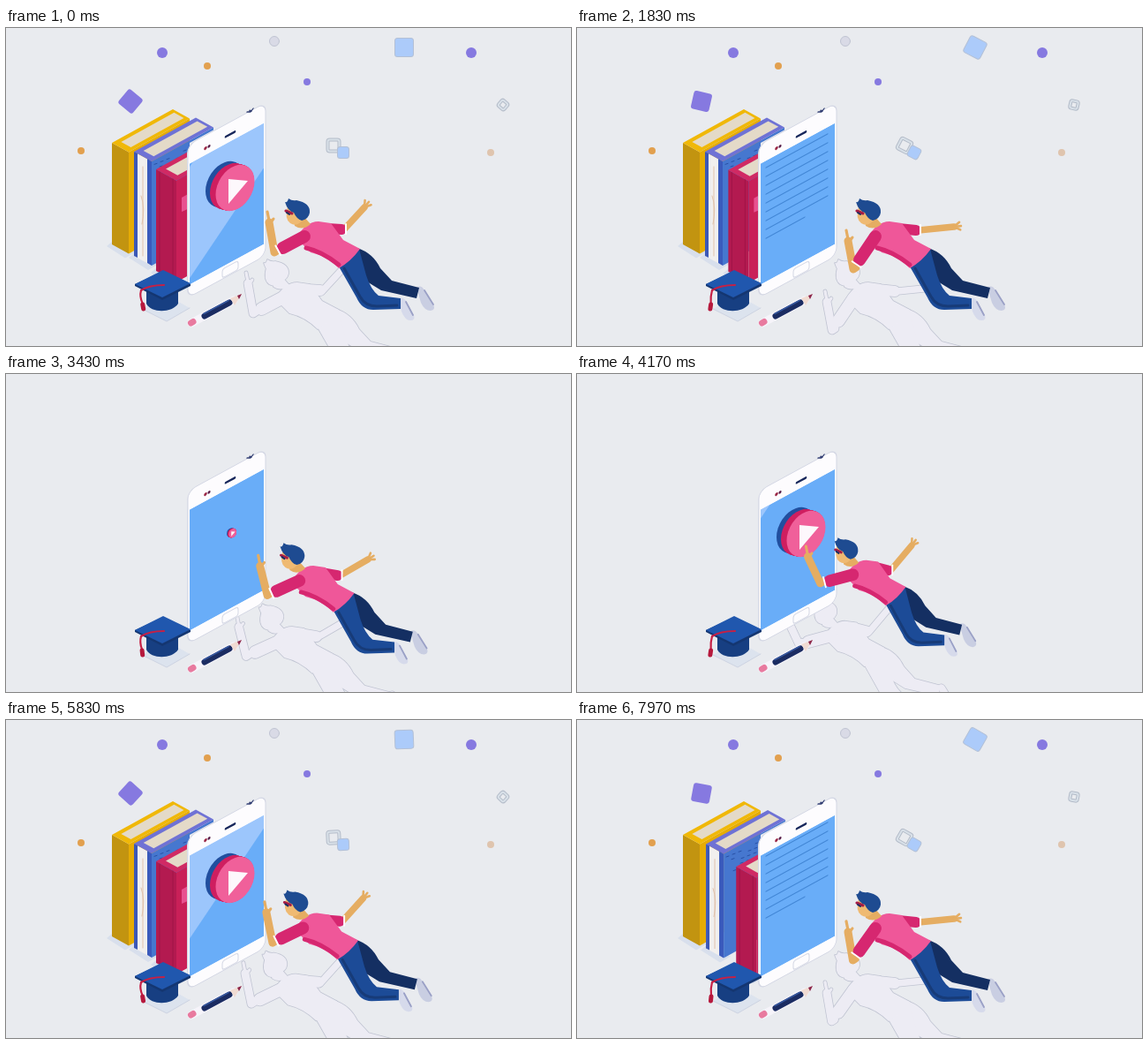
Recreate the animation shown at these times as an HTML page with a canvas. Size 640x360 px, loop 8 s.

```html
<!DOCTYPE html>
<html lang="en">
<head>
<meta charset="utf-8">
<title>Learning on a phone</title>
<style>
  html, body { margin: 0; width: 100%; height: 100%; overflow: hidden; background: #e9ebef; }
  canvas { display: block; width: 640px; height: 360px; }
</style>
</head>
<body>
<canvas width="640" height="360"></canvas>
<script>
const ctx = document.querySelector('canvas').getContext('2d');
const LOOP = 8000, CYCLE = 6000, BG = '#e9ebef', GREY = '#c0c4d2', SKIN = '#e5ad62';
ctx.lineJoin = ctx.lineCap = 'round';

const clamp = x => Math.max(0, Math.min(1, x));
const smooth = x => x * x * (3 - 2 * x);

// Interpolates rows of [time, value, value...].
function track(keys, t) {
  const next = keys.findIndex(k => k[0] > t);
  if (next < 0) return keys[keys.length - 1].slice(1);
  if (next === 0) return keys[0].slice(1);
  const a = keys[next - 1], b = keys[next];
  const p = smooth((t - a[0]) / (b[0] - a[0]));
  return a.slice(1).map((v, i) => v + (b[i + 1] - v) * p);
}

function fill(path, color) {
  ctx.fillStyle = color;
  ctx.fill(new Path2D(path));
}
function stroke(path, color, width) {
  ctx.strokeStyle = color;
  ctx.lineWidth = width;
  ctx.stroke(new Path2D(path));
}
function poly(points, color) {
  ctx.beginPath();
  points.forEach(p => ctx.lineTo(...p));
  ctx.closePath();
  ctx.fillStyle = color;
  ctx.fill();
}
function box(x, y, w, h, r, color, edge, width = 1) {
  ctx.beginPath();
  ctx.roundRect(x, y, w, h, r);
  if (color) { ctx.fillStyle = color; ctx.fill(); }
  if (edge) { ctx.strokeStyle = edge; ctx.lineWidth = width; ctx.stroke(); }
}
function ellipse(x, y, rx, ry, color) {
  ctx.beginPath();
  ctx.ellipse(x, y, rx, ry, 0, 0, 7);
  ctx.fillStyle = color;
  ctx.fill();
}

// x, y, size, kind, color, launch time, start angle, spin direction, edge
const floaters = [
  [177, 28, 6, 'dot', '#8679e0', 4660],
  [527, 28, 6, 'dot', '#8679e0', 4400],
  [341, 61, 4, 'dot', '#8679e0', 4490],
  [228, 43, 4, 'dot', '#e2a04f', 4520],
  [85, 139, 4, 'dot', '#e2a04f', 4590],
  [549, 141, 4, 'dot', '#dfc4ae', 4400],
  [304, 15, 5.5, 'dot', '#d9dae6', 4470, 0, 0, GREY],
  [141, 83, 21, 'square', '#8679e0', 4590, 40, -1],
  [451, 22, 21, 'square', '#accbfa', 4455, 0, 1, '#b3c0d6'],
  [563, 87, 8.5, 'ring', '#d8e0e8', 4550, 40, -1],
  [371, 133, 13, 'ring', '#d8e0e8', 4695, 0, 1],
  [382, 141, 13, 'square', '#accbfa', 4560, 0, 1, '#b3c0d6']
];

function drawFloaters(t) {
  for (const [x, y, size, kind, color, launch, angle = 0, spin = 0, edge] of floaters) {
    const pull = t < 3600
      ? clamp((t - 2400) / 550) ** 2
      : (1 - clamp((t - launch) / 1000)) ** 3;
    if (pull === 1) continue;
    ctx.save();
    ctx.translate(x + (249 - x) * pull, y + (189 - y) * pull);
    ctx.rotate((angle + spin * t * 0.015) * Math.PI / 180);
    if (kind === 'dot') {
      ellipse(0, 0, size, size, color);
      if (edge) { ctx.strokeStyle = edge; ctx.lineWidth = 1; ctx.stroke(); }
    } else if (kind === 'square') {
      box(-size / 2, -size / 2, size, size, 3, color, edge);
    } else {
      box(-size / 2, -size / 2, size, size, 2, null, '#b4bcc9', 4);
      box(-size / 2, -size / 2, size, size, 2, null, color, 2);
    }
    ctx.restore();
  }
}

// Isometric book; (x, y) is the left top corner of its front face.
function book(x, y, w, h, depth, front, side, rim) {
  const rise = depth * 0.55, half = w * 0.55;
  poly([[x - 6, y + h + 2], [x + w - 4, y + h + half + 5], [x + w + 8, y + h + half - 2], [x, y + h - 3]], '#d8dfec');
  poly([[x + w, y + half], [x + w + depth, y + half - rise], [x + w + depth, y + half - rise + h], [x + w, y + half + h]], side);
  poly([[x, y], [x + w, y + half], [x + w, y + half + h], [x, y + h]], front);
  poly([[x, y], [x + depth, y - rise], [x + w + depth, y + half - rise], [x + w, y + half]], rim);
  const a = 0.22 * w, b = 0.8 * w, inset = depth * 0.09;
  poly([[x + a + inset, y + a * .55 - inset * .55], [x + a + depth * .96, y + a * .55 - rise * .96],
        [x + b + depth * .96, y + b * .55 - rise * .96], [x + b + inset, y + b * .55 - inset * .55]], '#e4dac8');
}

const shiftKeys = {
  yellow: [[4550, 95], [5080, -17], [5200, -15], [5700, 0]],
  blue: [[4400, 75], [4950, -9], [5130, -5], [5500, 0]],
  red: [[4250, 50], [4800, -6], [5130, -2], [5400, 0]]
};

function slideBook(name, t, leave, hidden, draw) {
  const shift = t < 3600
    ? 2.1e-4 * Math.max(0, t - leave) ** 2
    : track(shiftKeys[name], t)[0];
  if (shift >= hidden) return;
  ctx.save();
  ctx.translate(shift, shift * 0.59);
  draw();
  ctx.restore();
}

function drawBooks(t) {
  ctx.save();
  ctx.clip(new Path2D('M0 0H290V86L208 130V360H0Z'));
  slideBook('yellow', t, 2150, 94, () => {
    book(120, 130, 19, 115, 69, '#c29410', '#e6ac04', '#f0b808');
    const open = track([[4800, 0], [5110, 1], [5180, 1], [5500, 0]], t)[0];
    if (open > 0) {
      const lift = (x, y, dx, dy) => [x + dx * open, y + dy * open];
      poly([[128, 132], lift(188, 100, -12, -2), [203, 102], [138, 138]], '#dcd0bd');
      poly([[120, 130], lift(190, 92, -27, -8), lift(193, 94, -27, -4), lift(123, 132, 6, 3)], '#e0a704');
      stroke(`M120 130L${lift(190, 92, -27, -8)}`, '#f3c030', 1.5);
    }
  });
  slideBook('blue', t, 1900, 74, () => {
    book(145, 140, 20, 118, 70, '#f1efee', '#4677cf', '#6f72d5');
    poly([[145, 140], [149, 142], [149, 260], [145, 258]], '#3c58b6');
    poly([[160, 148], [165, 151], [165, 269], [160, 266]], '#3a5abc');
    stroke('M155 157V258M153 190Q158 204 154 222', '#e1c2ab', 1);
    for (let i = 0; i < 24; i++) {
      const x = 168 + (i * 17) % 60;
      const y = 151 - (x - 165) * .55 + 5 + (i * 11) % 24;
      stroke(`M${x} ${y}l3 -1`, '#2951a6', 1);
    }
  });
  slideBook('red', t, 1750, 49, () => {
    book(170, 160, 23, 115, 66, '#b31a50', '#c92058', '#d02a64');
    stroke('M174 163V276M189 171V283', '#a01447', 1);
    poly([[199, 192], [208, 187], [208, 204], [199, 208]], '#e85290');
  });
  ctx.restore();
}

function drawPhone(t) {
  ctx.save();
  ctx.transform(1, -0.545, 0, 1, 206, 132.5);
  box(-1, 0, 88, 173, 9, '#dfe1ea');
  box(0, 0, 88, 173, 9, '#fdfcfe', '#d4d7e4');
  box(39, 162, 18, 10, 3, '#fdfcfe', '#d4d7e4');
  stroke('M43 14H53', '#18275b', 2.6);
  ellipse(20, 14.5, 1.8, 1.8, '#9b2746');
  ellipse(24, 14.5, 1.6, 1.6, '#59204b');
  stroke('M67 -1l4 2M70 -1l2 2M74 -1l-3 2', '#344074', 1.5);

  ctx.beginPath();
  ctx.rect(2, 22, 84, 137);
  ctx.clip();
  ctx.fillStyle = '#69adf8';
  ctx.fillRect(2, 22, 84, 137);

  for (let i = 0; i < 12; i++) {
    const v = 110 + 10 * i - 0.1 * (t - 730);
    if (t < 3000 && v > 20 && v < 160) stroke(`M8 ${v}H${i === 11 ? 52 : 78}`, '#4287d6', 1.2);
  }

  // Two diagonal glares cross the screen, one after the other.
  const late = t < 3000 ? t + CYCLE : t;
  for (const start of [4700, 5960]) {
    const trail = 0.21 * (late - start) + 19;
    const lead = trail + 126;
    poly([[0, trail], [88, trail - 83], [88, lead - 83], [0, lead]], 'rgba(190,215,255,.6)');
  }
  ctx.restore();
}

function drawPlay(t) {
  const size = t < 3000
    ? 1 - smooth(clamp((t - 200) / 350))
    : track([[3350, 0], [3650, 1.1], [3850, 1]], t)[0];
  if (size <= 0) return;
  ctx.save();
  ctx.translate(256, 180);
  ctx.scale(size, size);
  const disc = (x, y, color) => {
    ctx.save();
    ctx.transform(1, -0.35, 0, 1, x, y);
    ellipse(0, 0, 22, 25, color);
    ctx.restore();
  };
  disc(-8, -3, '#214f9f');
  for (let x = -3; x <= 3; x++) disc(x, x * .25, '#cf1f60');
  disc(3.5, 1, '#f0609a');
  poly([[-4, -9], [18, -7], [-4, 19]], '#fdf8fc');
  ctx.restore();
}

function drawCap(t) {
  fill('M154 318L182 332L208 317L183 303Z', '#dce3ee');
  stroke('M154 318L182 332L208 317', '#cdd3e2', 1);
  fill('M159 297V312C164 323 188 323 195 312V296Z', '#173f82');
  fill('M146 290L178 275L209 290V292L177 308L146 292Z', '#143671');
  fill('M146 290L178 274L209 289L177 305Z', '#2057ae');
  const sway = 1.8 * Math.cos(t / CYCLE * 4 * Math.PI);
  stroke(`M179 291Q162 291 153 297Q151 304 ${153 + sway} 312`, '#c62045', 2.2);
  stroke(`M${153 + sway} 313l${sway / 2} 5`, '#b6193d', 5);
}

function drawPencil() {
  stroke('M210 334L258 308', '#f6f4fa', 9);
  stroke('M209.5 334L212 332.5', '#e87a9f', 7);
  stroke('M225 326L253 311', '#1b2c62', 7);
  stroke('M224 323.5L252 308.5', '#35569c', 1.6);
  fill('M254 306L267 301L259 314Z', '#f0dbd2');
  fill('M262 303L267 301L264 307Z', '#8c2549');
}

// time, front elbow, front hand, rear elbow, rear hand
const armKeys = [
  [0, 304, 254, 297, 213, 386, 228, 406, 203],
  [730, 313, 268, 306, 228, 388, 230, 415, 204],
  [1830, 313, 273, 306, 234, 390, 229, 427, 225],
  [2100, 312, 271, 306, 232, 390, 229, 427, 225],
  [2630, 304, 260, 302, 217, 390, 229, 426, 223],
  [4170, 299, 246, 283, 208, 386, 231, 408, 202],
  [5130, 299, 242, 281, 196, 386, 231, 409, 199],
  [6000, 304, 254, 297, 213, 386, 228, 406, 203]
];

function drawMan(t, mode) {
  const shape = (path, color) => {
    if (mode === 'outline') stroke(path, GREY, 1.6);
    else fill(path, mode === 'inside' ? '#edecf4' : color);
  };
  const limb = (path, color, width) => {
    if (mode === 'outline') stroke(path, GREY, width + 1.6);
    else stroke(path, mode === 'inside' ? '#edecf4' : color, width);
  };
  const detail = (path, color, width) => { if (!mode) stroke(path, color, width); };
  const [ex, ey, hx, hy, bx, by, rx, ry] = track(armKeys, t);

  // Rear arm
  limb(`M${bx - 3} ${by}L${rx} ${ry}`, SKIN, 7.5);
  const ra = Math.atan2(ry - by, rx - bx);
  for (const spread of [-.6, 0, .55]) {
    limb(`M${rx} ${ry}l${8 * Math.cos(ra + spread)} ${8 * Math.sin(ra + spread)}`, SKIN, 2.6);
  }
  limb(`M364 227L${bx - 6} ${by}`, '#d62770', 12);
  detail(`M${bx - 1} ${by - 6}L${bx - 1} ${by + 5}`, '#fff', 2);

  // Legs and shoes
  shape('M465 294Q470 290 474 297L484 313Q487 319 481 320Q474 320 470 311Z', '#c9cee2');
  shape('M398 249Q416 255 424 272L437 286L468 294L465 306L425 297L394 278Z', '#142f62');
  shape('M445 307Q449 303 454 310L462 325Q464 331 458 331Q452 331 448 321Z', '#d6daeb');
  detail('M474 297L484 313M453 310L461 325', '#9aa0c6', 1.8);
  shape('M377 270L397 305Q403 319 416 319L447 318V306L422 303Q413 296 408 280L400 250Z', '#1c4b97');
  detail('M383 272L401 304Q407 315 420 315L443 314', '#173b78', 3);

  // Torso and head
  shape('M329 238Q339 219 354 219L368 221L382 240L401 250Q391 264 377 272Q363 258 345 254Z', '#ef5799');
  detail('M340 249Q358 253 377 268', '#d62770', 5);
  shape('M326 215L337 213L345 222Q336 230 327 224Z', SKIN);
  shape('M319 202Q315 216 322 221Q330 226 337 216L335 201Z', '#efba72');
  shape('M316 197Q319 198 320 193Q324 196 329 195Q345 198 344 209Q343 216 335 218Q329 216 326 209Q319 207 316 197Z', '#1e4b91');
  detail('M317 207L324 210', '#a61d47', 3);
  detail('M318 209L321 211', '#182d63', 2);

  // Front arm
  limb(`M${ex + 3} ${ey - 2}L${ex} ${ey}L${hx + 1} ${hy + 7}`, SKIN, 9);
  limb(`M${hx + 1} ${hy + 5}L${hx - 1} ${hy - 5}`, SKIN, 3.2);
  limb(`M${hx + 3} ${hy + 7}L${hx + 6} ${hy + 3}`, SKIN, 3);
  const sx = 338 + (ex - 338) * .72, sy = 236 + (ey - 236) * .72;
  limb(`M338 236L${sx} ${sy}`, '#d62770', 14);
  const dir = Math.atan2(ey - 236, ex - 338);
  const cx = sx + 6 * Math.cos(dir), cy = sy + 6 * Math.sin(dir);
  const nx = -6 * Math.sin(dir), ny = 6 * Math.cos(dir);
  detail(`M${cx - nx} ${cy - ny}L${cx + nx} ${cy + ny}`, '#fff', 2);
}

// Reaching moves the whole body and draws the legs in a little.
function placeMan(t, dx, dy, mode) {
  const [reach] = track([[3200, 0], [3950, 1], [5200, 1], [5950, 0]], t);
  ctx.save();
  ctx.translate(dx + 330 - 25 * reach, dy + 205 - 8 * reach);
  ctx.scale(1 - .05 * reach, 1 - .025 * reach);
  ctx.translate(-330, -205);
  drawMan(t, mode);
  ctx.restore();
}

function render(t) {
  ctx.fillStyle = BG;
  ctx.fillRect(0, 0, 640, 360);
  drawFloaters(t);
  drawBooks(t);
  placeMan(t, -24, 69, 'outline');
  placeMan(t, -24, 69, 'inside');
  drawPhone(t);
  drawPlay(t);
  drawCap(t);
  drawPencil();
  placeMan(t, 0, 0);
}

function frame() {
  render(performance.now() % LOOP % CYCLE);
  requestAnimationFrame(frame);
}
frame();
</script>
</body>
</html>
```
